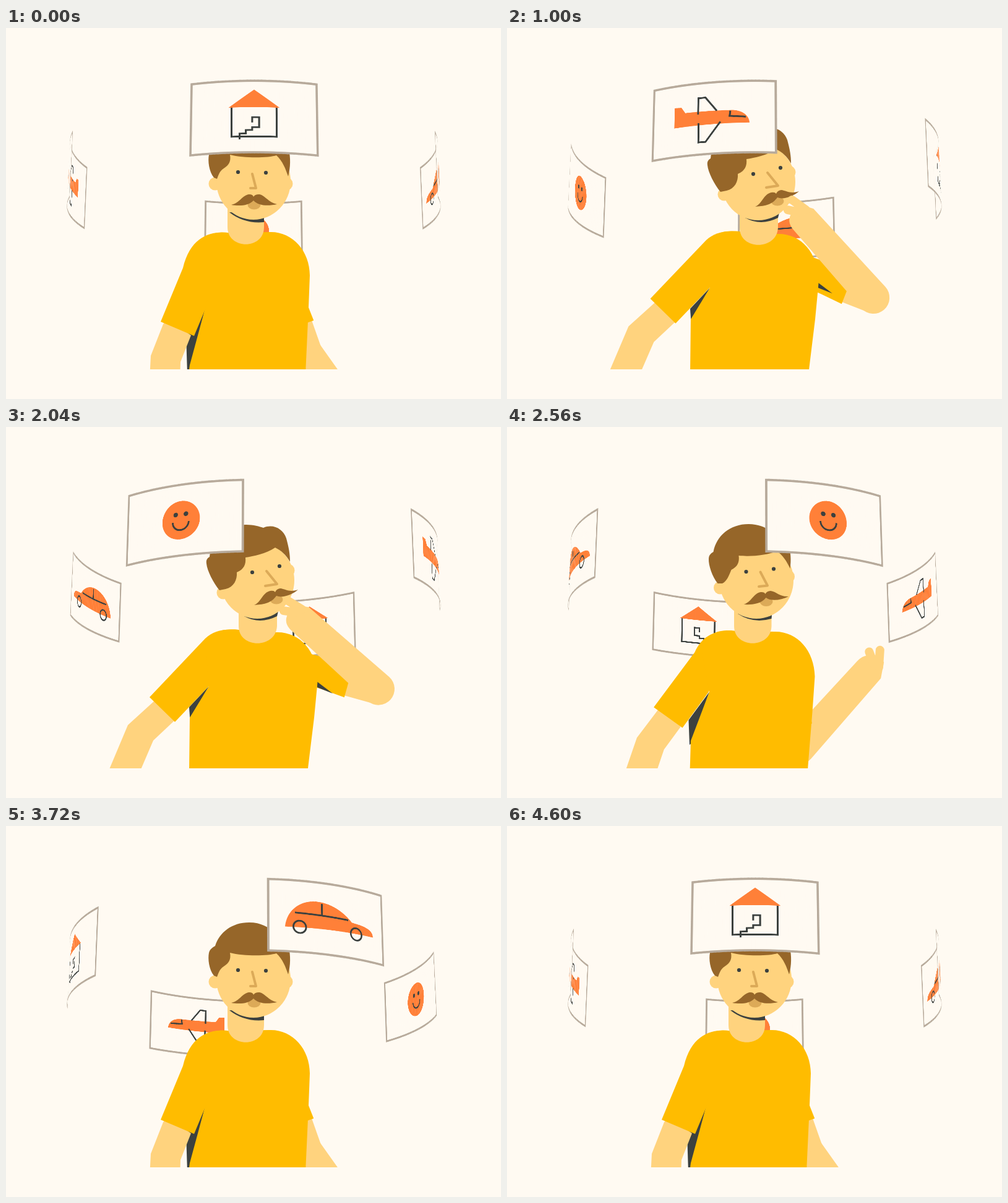
Write an HTML page with a canvas that moves like this. It is 800 by 600 pixels and loops after 4.64 s.

```html
<!DOCTYPE html>
<html lang="en">
<head>
<meta charset="utf-8">
<style>
  html, body { margin: 0; width: 100%; height: 100%; overflow: hidden; background: #fffaf2; }
  canvas { display: block; }
</style>
</head>
<body>
<canvas id="stage" width="800" height="600"></canvas>
<script>
const ctx = document.getElementById('stage').getContext('2d');
const PAPER = '#fffaf2', DARK = '#3c413f', ORANGE = '#ff8038', FRAME = '#b7aa9b';
const SHIRT = '#ffbc00', SKIN = '#ffd37e', HAIR = '#966629', TAN = '#dcaa58';
const RAD = Math.PI / 180;
const STEP = 40, STEPS = 116;

const lerp = (a, b, k) => a + (b - a) * k;
const ramp = (t, from, to) => Math.min(1, Math.max(0, (t - from) / (to - from)));
const easeIn = k => k * k;
const easeOut = k => k * (2 - k);
const easeInOut = k => k * k * (3 - 2 * k);

// ---- Cards: textures bent around a turning cylinder ----
const TEX_W = 420, TEX_H = 252, STRIPS = 36;
const HALF_ARC = 17.65 * RAD, TILT = 17.9 * RAD;
const RADIUS = 0.1471, HALF_HEIGHT = 0.0272, FOCAL = 2015;

function makeCard(drawArt) {
  const canvas = document.createElement('canvas');
  canvas.width = TEX_W;
  canvas.height = TEX_H;
  const c = canvas.getContext('2d');
  c.fillStyle = PAPER;
  c.fillRect(0, 0, TEX_W, TEX_H);
  c.setTransform(2, 0, 0, 2, TEX_W / 2, TEX_H / 2);
  c.strokeStyle = FRAME;
  c.lineWidth = 3.8;
  c.strokeRect(-103.1, -61.1, 206.2, 122.2);
  c.strokeStyle = DARK;
  c.lineWidth = 3;
  drawArt(d => { c.fillStyle = ORANGE; c.fill(new Path2D(d)); },
          d => c.stroke(new Path2D(d)),
          (x, y, r) => { c.fillStyle = DARK; c.beginPath(); c.arc(x, y, r, 0, 7); c.fill(); });
  return canvas;
}

const ring = (x, y, r) => `M${x - r} ${y}a${r} ${r} 0 1 1 ${2 * r} 0a${r} ${r} 0 1 1 ${-2 * r} 0Z`;

const cards = [
  makeCard((fill, line) => {
    line('M-36 -16V34H36V-16');
    line('M-23 39V29H-13V23H-3V18H8V1H-3V10');
    fill('M-41 -16L0 -46L41 -16Z');
  }),
  makeCard((fill, line) => {
    fill('M-76 19C-73 -10 -50 -28 -22 -28C5 -28 28 -14 40 -1C60 1 82 2 82 17Z');
    line('M-60 -6L33 -4M-14 -25V-5');
    line(ring(-52, 18, 10.5) + ring(48, 18, 10.5));
  }),
  makeCard((fill, line, dot) => {
    fill(ring(0, 0, 33));
    dot(-9, -10, 4);
    dot(9, -10, 4);
    line('M-14 3A14 14 0 0 0 14 3');
  }),
  makeCard((fill, line) => {
    fill('M-64 11V-24L-52 -23L-45 -13L30 -12C48 -12 60 -3 61 10Z');
    line('M30 -11L29 -2L55 0');
    line('M-23 -8V-36H-11L8 -12M-22 7V40H-10L14 7');
  })
];

function project(angle, h) {
  const z = RADIUS * Math.cos(angle), sin = Math.sin(TILT), cos = Math.cos(TILT);
  const scale = FOCAL / (1 - z * cos - h * sin);
  return [400.4 + RADIUS * Math.sin(angle) * scale, 248.5 + (h * cos - z * sin) * scale];
}

function cardStrips(turn) {
  const strips = [], w = TEX_W / STRIPS, arc = 2 * HALF_ARC / STRIPS;
  cards.forEach((tex, n) => {
    for (let i = 0; i < STRIPS; i++) {
      const angle = turn + n * Math.PI / 2 - HALF_ARC + i * arc;
      strips.push({ tex, angle, arc, w, x: i * w, depth: Math.cos(angle + arc / 2) });
    }
  });
  return strips.sort((a, b) => a.depth - b.depth);
}

function drawStrip({ tex, angle, arc, w, x }) {
  const [x0, y0] = project(angle, -HALF_HEIGHT);
  const [x1, y1] = project(angle + arc, -HALF_HEIGHT);
  const [x2, y2] = project(angle, HALF_HEIGHT);
  const wide = Math.min(w + 2, TEX_W - x);
  ctx.setTransform((x1 - x0) / w, (y1 - y0) / w, (x2 - x0) / TEX_H, (y2 - y0) / TEX_H, x0, y0);
  ctx.drawImage(tex, x, 0, wide, TEX_H, 0, 0, wide, TEX_H);
}

// ---- Man: every shape blends between a resting and a thinking outline ----
let lean = 0;

function blend(rest, think) {
  const goal = think.match(/-?[\d.]+/g);
  let i = 0;
  return new Path2D(rest.replace(/-?[\d.]+/g, v => lerp(+v, +goal[i++], lean)));
}

function shape(color, rest, think) {
  ctx.fillStyle = color;
  ctx.fill(blend(rest, think));
}

function oval(color, rest, think, rx, ry = rx) {
  ctx.fillStyle = color;
  ctx.beginPath();
  ctx.ellipse(lerp(rest[0], think[0], lean), lerp(rest[1], think[1], lean), rx, ry, 0, 0, 7);
  ctx.fill();
}

function stroke(color, width, path) {
  ctx.strokeStyle = color;
  ctx.lineWidth = width;
  ctx.stroke(path);
}

// time, elbow x, elbow y, forearm angle, wrist angle, easing into the key
const ARM = [
  [0, 487, 528, 54, 0],
  [560, 519, 519, -83.4, 0, easeInOut],
  [1120, 602, 425, -138, 20, easeInOut],
  [2260, 602, 423.5, -138, 20, easeInOut],
  [2560, 472, 519, -48, -8, easeIn],
  [2860, 487, 528, 54, 0, easeOut],
  [5000, 487, 528, 54, 0, easeOut]
];

function armPose(t) {
  const i = ARM.findIndex(key => key[0] > t), a = ARM[i - 1], b = ARM[i];
  const k = b[5](ramp(t, a[0], b[0]));
  return [1, 2, 3, 4].map(n => lerp(a[n], b[n], k));
}

function drawForearm([x, y, angle, wrist]) {
  ctx.save();
  ctx.translate(x, y);
  ctx.rotate(angle * RAD);
  ctx.fillStyle = SKIN;
  ctx.fill(new Path2D('M0 -26L167 -24Q186 -24 190 -8L195 9L172 23L0 26A26 26 0 0 1 0 -26Z'));
  ctx.translate(172, 0);
  ctx.rotate(wrist * RAD);
  stroke(SKIN, 14, new Path2D('M10 0L22 -17M10 10L34 -4'));
  ctx.restore();
}

function drawUpperArm([x, y]) {
  const sx = lerp(437, 456, lean), sy = lerp(386, 383, lean);
  const length = Math.hypot(x - sx, y - sy);
  ctx.save();
  ctx.translate(sx, sy);
  ctx.rotate(Math.atan2(y - sy, x - sx));
  ctx.fillStyle = SKIN;
  ctx.fillRect(0, -25, length, 50);
  ctx.fillStyle = SHIRT;
  ctx.fill(new Path2D('M0 -24L102 -28V28L0 20Z'));
  ctx.restore();
}

function drawLeftArm(swing) {
  const px = lerp(305, 325, lean), py = 345;
  ctx.save();
  ctx.translate(px, py);
  ctx.rotate(swing);
  ctx.translate(-px, -py);
  shape(SKIN, 'M262 470L254 479L234 530L232 570H281L282 540L299 497Z',
              'M250 430L242 441L197 482L160 570H211L238 507L272 475Z');
  shape(SHIRT, 'M358 331C330 328 298 338 286 388L250 475L304 498L329 438Z',
               'M376 328C350 326 335 330 322 342L232 437L273 477L328 419Z');
  ctx.restore();
}

function drawHead() {
  shape(SKIN, 'M358 280H417V322C417 359 358 359 358 322Z', 'M376 280H438V322C436 359 376 359 376 322Z');
  shape(DARK, 'M361 298Q385 317 417 314L417 300Z', 'M385 306Q410 320 438 306L440 298Z');
  oval(SKIN, [338, 252], [351, 268], 10.5);
  oval(SKIN, [453, 252], [456, 232], 10.5);
  oval(SKIN, [400, 248], [406, 248], 60, 62);
  shape(HAIR,
    'M336 242C328 232 326 215 328 205C330 198 335 196 338 194C345 172 365 156 393 156C412 156 425 164 432 171C446 170 456 182 457 196C460 210 460 225 456 240C452 228 447 215 437 206C425 210 385 211 362 205C364 216 360 222 352 227C344 232 343 240 341 244Z',
    'M345 264C335 252 325 232 324 221C323 214 326 212 329 210C332 180 355 158 388 158C400 158 410 161 416 163C432 156 448 165 453 180C457 195 459 205 459 218C452 206 445 200 435 195C420 205 400 209 387 211C388 222 385 230 373 235C374 247 368 259 355 262Z');
  oval(DARK, [375, 233], [398, 235], 3.1);
  oval(DARK, [420, 234], [442, 225], 3.1);
  stroke(TAN, 4, blend('M398 236L404 259L395 259', 'M421 233L438 254L419 257'));
  oval(TAN, [401, 286], [437, 279], 10.5, 7.5);
  shape(HAIR,
    'M364 286C378 283 382 270 393 269Q399 269 400 273Q402 269 409 269C418 270 424 282 438 285C424 288 408 288 400 279C392 288 376 288 364 286Z',
    'M401 288C413 283 414 268 427 265Q433 264 435 267Q437 262 443 261C452 262 458 268 472 263C462 272 446 277 437 273C428 286 414 287 401 288Z');
}

function drawMan(t) {
  lean = easeInOut(ramp(t, 0, 560)) * (1 - easeInOut(ramp(t, 2260, 2860)));
  const dip = easeInOut(ramp(t, 0, 560)) * (1 - easeInOut(ramp(t, 560, 1120)));
  const arm = armPose(t);
  const armInFront = t > 480 && t < 2420;

  ctx.save();
  ctx.beginPath();
  ctx.rect(0, 0, 800, 552);
  ctx.clip();
  ctx.lineCap = ctx.lineJoin = 'round';

  if (!armInFront) drawForearm(arm);
  drawUpperArm(arm);
  const lift = ramp(arm[1], 500, 430);
  ctx.fillStyle = DARK;
  ctx.fill(new Path2D(`M503 412V${412 + 9 * lift}L${503 + 25 * lift} ${412 + 19 * lift}Z`));

  ctx.translate(0, 9 * dip);
  shape(DARK, 'M326 438L291 495L293 560L297 552Z', 'M328 419L296 453L297 468L298 472Z');
  drawLeftArm(0.035 * (4 * lean * (1 - lean) + dip));
  shape(SHIRT,
    'M358 331C335 329 315 336 305 360L326 438L297 545L295 560L484 560L489 452L491 400C491 360 462 328 425 330Z',
    'M376 328C350 326 335 330 322 350L328 419L297 470L296 560L487 560L498 470L504 407C502 362 475 331 437 332Z');
  drawHead();
  ctx.translate(0, -9 * dip);
  if (armInFront) drawForearm(arm);
  ctx.restore();
}

function render(now) {
  const t = Math.floor(now / STEP) % STEPS * STEP;
  const strips = cardStrips((360 * t / 4600 + 0.1) * RAD);
  ctx.setTransform(1, 0, 0, 1, 0, 0);
  ctx.fillStyle = PAPER;
  ctx.fillRect(0, 0, 800, 600);
  strips.filter(s => s.depth < 0).forEach(drawStrip);
  ctx.setTransform(1, 0, 0, 1, 0, 0);
  drawMan(t);
  strips.filter(s => s.depth >= 0).forEach(drawStrip);
}

let start;
function tick(now) {
  start ??= now;
  render(now - start);
  requestAnimationFrame(tick);
}
render(0);
requestAnimationFrame(tick);
</script>
</body>
</html>
```
